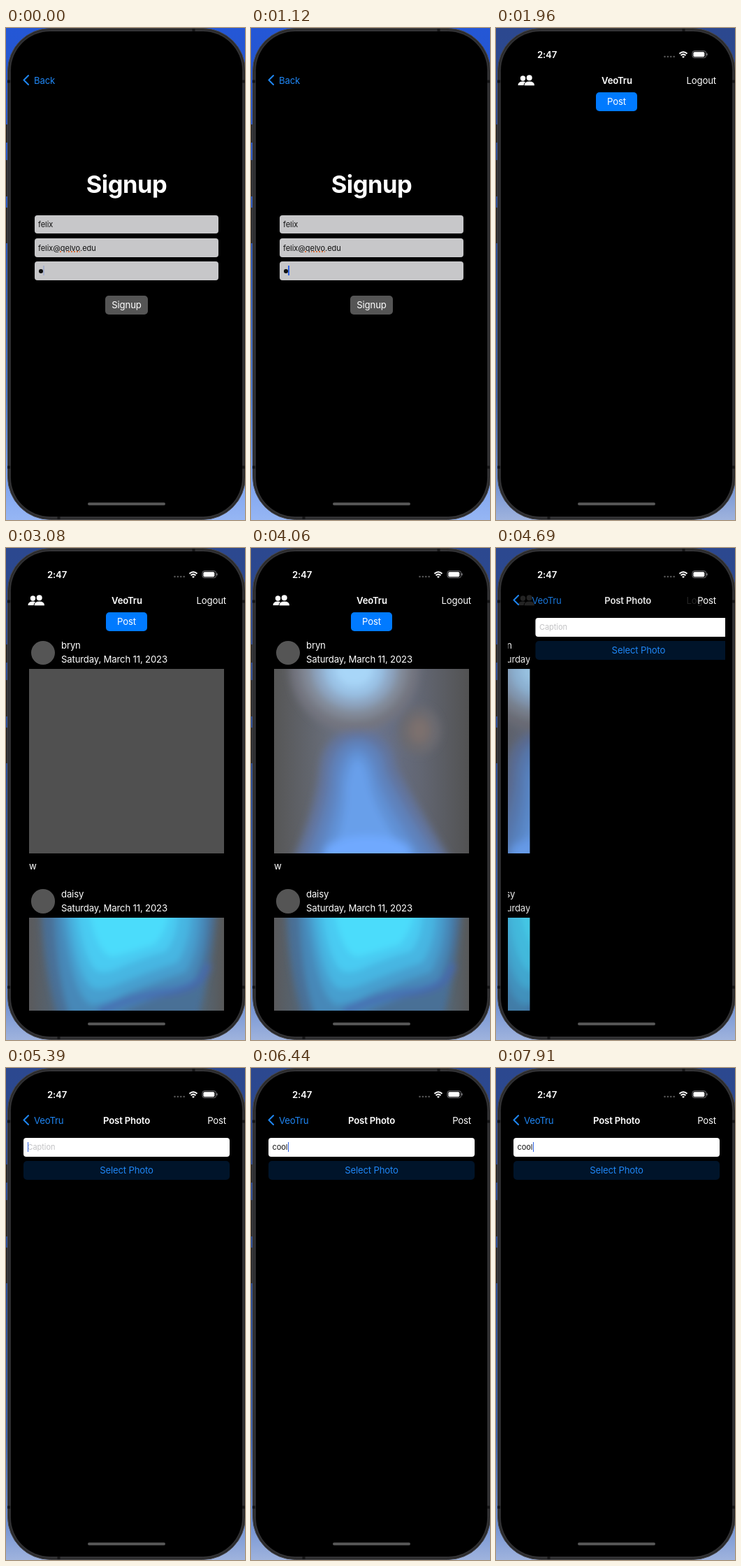
An HTML page that plays this animation: 342x704 px, repeating every 8000 ms.

```html
<!DOCTYPE html>
<html lang="en">
<head>
<meta charset="utf-8">
<title>Photo sharing app</title>
<style>
  html, body { margin: 0; width: 100%; height: 100%; overflow: hidden; background: #000; }
  #stage { position: absolute; left: 0; top: 0; width: 342px; height: 704px; overflow: hidden;
    font: 400 13.2px/20px Inter, "Open Sans", sans-serif; letter-spacing: -.18px; color: #fff;
    background: linear-gradient(#2c488f, #284a92 45%, #3d62ae 75%, #6f90d2 92%, #9fb3dd); }
  #stage.bright { background: linear-gradient(#2457d6, #2a55b4 45%, #4a78cc 75%, #7ea3ee 92%, #96b6f4); }
  #stage *, #stage svg { position: absolute; }
  #stage span span, #stage svg * { position: static; }
  span { white-space: nowrap; }
  .layer { left: 0; top: 0; width: 342px; height: 704px; }
  .clip { left: 17px; top: 0; width: 311px; height: 704px; overflow: hidden; }
  .clip > .layer { left: -17px; }
  .mid { left: 0; width: 345px; text-align: center; }
  .right { right: 27px; }
  .bold { font-weight: 600; }
  .blue { color: #1f86f4; }
  .small { font-size: 11px; letter-spacing: -.05px; color: #111; }
  .field { left: 41px; width: 263px; height: 26.5px; border-radius: 4px; background: #c7c7c9; }
  .btn { border-radius: 5px; text-align: center; line-height: 27px; height: 27px; }
  .avatar { left: 35.5px; width: 34.4px; height: 34.4px; border-radius: 50%; background: #555; }
  .pic { left: 32.8px; width: 279.4px; height: 264.6px; background: #505050; overflow: hidden; }
  .pic svg { left: 0; top: 0; }
  .misspelt { text-decoration: underline dotted #d8703c 1.5px; text-underline-offset: 1px; }
  .caret { width: 1.6px; height: 14px; background: #2f62e2; }
</style>
</head>
<body>
<div id="stage">
  <svg class="layer" viewBox="0 0 342 704">
    <path d="M1 138v26M1 189v52M1 257v51" stroke="#262628" stroke-width="3"/>
    <rect x="2.5" y=".5" width="340" height="703" rx="61" fill="#29292b" stroke="#48484b"/>
    <rect x="5.5" y="3.5" width="334" height="697" rx="58" fill="none" stroke="#39393b"/>
    <path d="M2 76.5h4M2 628.5h4M338 76.5h4M338 628.5h4M268.5 1v4M75.5 699v4" stroke="#151516" stroke-width="4"/>
    <rect x="7" y="5" width="331" height="694" rx="56" fill="#000"/>
  </svg>

  <div class="layer" id="signup">
    <svg class="layer" viewBox="0 0 342 704" fill="none" stroke="#1f86f4" stroke-width="2" stroke-linecap="round" stroke-linejoin="round"><path d="M32 68l-6.5 6.5 6.5 6.5"/></svg>
    <span class="blue" style="left:40px;top:65px">Back</span>
    <span class="mid" style="top:204px;line-height:40px;font-size:34.5px;font-weight:700;letter-spacing:-.5px">Signup</span>
    <div class="field" style="top:267.5px"></div>
    <div class="field" style="top:301px"></div>
    <div class="field" style="top:334px"></div>
    <span class="small" style="left:46px;top:271px">felix</span>
    <span class="small" style="left:46px;top:304.5px">felix@<span class="misspelt">qelvo</span>.edu</span>
    <div style="left:47px;top:345px;width:5.5px;height:5.5px;border-radius:50%;background:#111"></div>
    <div class="caret" id="passCaret" style="left:53px;top:340px"></div>
    <div class="btn" id="signBtn" style="left:142px;top:383px;width:61px;background:#555">Signup</div>
  </div>

  <div class="layer" id="app">
    <div class="clip">
      <div class="layer" id="feed">
        <div class="btn" style="left:142.6px;top:91.6px;width:59.8px;height:27.8px;background:#007aff">Post</div>
        <div class="layer" id="posts" style="height:662px;overflow:hidden">
          <div class="avatar" style="top:132.8px"></div>
          <span style="left:79px;top:129px">bryn</span>
          <span style="left:79px;top:149px">Saturday, March 11, 2023</span>
          <div class="pic" style="top:172.8px">
            <svg id="pic1" width="280" height="265" viewBox="0 0 280 265">
              <defs>
                <filter id="soft" x="-50%" y="-50%" width="200%" height="200%"><feGaussianBlur stdDeviation="6"/></filter>
                <linearGradient id="haze"><stop stop-color="#565656"/><stop offset=".25" stop-color="#666b76"/><stop offset=".45" stop-color="#6c7794"/><stop offset=".75" stop-color="#626672"/><stop offset="1" stop-color="#525252"/></linearGradient>
              </defs>
              <rect width="280" height="265" fill="url(#haze)"/>
              <g filter="url(#soft)">
                <ellipse cx="115" cy="0" rx="92" ry="90" fill="#73757f"/>
                <ellipse cx="115" cy="0" rx="76" ry="73" fill="#828a98"/>
                <ellipse cx="115" cy="0" rx="60" ry="57" fill="#8ea6c2"/>
                <ellipse cx="115" cy="0" rx="44" ry="42" fill="#9ac2e6"/>
                <ellipse cx="115" cy="0" rx="28" ry="26" fill="#a8d6f8"/>
                <ellipse cx="208" cy="88" rx="30" ry="34" fill="#6c6a70"/>
                <ellipse cx="208" cy="88" rx="15" ry="18" fill="#7c706e"/>
                <path d="M20 290Q62 200 66 140 72 92 120 88 168 92 174 140 200 190 262 290Z" fill="#62759e"/>
                <path d="M38 290Q78 200 80 146 88 102 120 100 154 104 160 146 182 196 246 290Z" fill="#5f82bc"/>
                <path d="M56 290Q92 205 92 156 100 116 119 114 140 118 148 156 164 204 228 290Z" fill="#6090d4"/>
                <path d="M72 290Q104 220 102 170 108 130 119 128 132 132 138 170 150 214 206 290Z" fill="#679fea"/>
                <ellipse cx="134" cy="264" rx="62" ry="26" fill="#6fa9fe"/>
              </g>
            </svg>
          </div>
          <span style="left:33px;top:445px">w</span>
          <div class="avatar" style="top:488.3px"></div>
          <span style="left:79px;top:484.5px">daisy</span>
          <span style="left:79px;top:504.5px">Saturday, March 11, 2023</span>
          <div class="pic" style="top:528.5px">
            <svg id="pic2" width="280" height="134" viewBox="0 0 280 134">
              <defs>
                <linearGradient id="sea"><stop stop-color="#5a5a5c"/><stop offset=".1" stop-color="#56626e"/><stop offset=".5" stop-color="#4a6c94"/><stop offset=".9" stop-color="#566470"/><stop offset="1" stop-color="#585858"/></linearGradient>
                <filter id="soft2" x="-50%" y="-50%" width="200%" height="200%"><feGaussianBlur stdDeviation="5"/></filter>
              </defs>
              <rect width="280" height="134" fill="url(#sea)"/>
              <g filter="url(#soft2)">
                <path d="M18-20H268Q262 70 240 150H44Q20 80 18-20Z" fill="#4a7096"/>
                <path d="M36-20H256Q256 60 232 96 190 112 150 126 120 140 90 150H62Q38 90 36-20Z" fill="#4788b8"/>
                <path d="M46-20H244Q246 40 224 78 180 92 140 108 110 126 88 124 60 110 46-20Z" fill="#469fcf"/>
                <path d="M56-20H232Q232 36 212 64 170 78 130 94 104 106 90 100 66 80 56-20Z" fill="#46b6e2"/>
                <path d="M68-20H214Q214 26 196 48 160 58 124 74 104 82 94 74 74 50 68-20Z" fill="#48cbf2"/>
                <path d="M84-20H202Q200 16 180 38 150 48 120 56 96 54 84-20Z" fill="#4cdcfb"/>
                <path d="M100 134Q150 112 200 106T256 66" fill="none" stroke="#4668b0" stroke-width="11" opacity=".75"/>
              </g>
            </svg>
          </div>
        </div>
        <div class="layer" id="dim" style="top:90px;height:580px;background:#000;opacity:0"></div>
      </div>

      <div class="layer" id="compose">
        <div style="left:17px;top:90px;width:311px;height:580px;background:#000"></div>
        <div style="left:24.8px;top:99.6px;width:295.4px;height:27.2px;border-radius:4px;background:#fff"></div>
        <span class="small" id="hint" style="left:30.5px;top:103px;color:#c2c2c4">Caption</span>
        <span class="small" style="left:30.5px;top:103px"><span id="typed"></span></span>
        <div class="caret" id="capCaret" style="top:106px"></div>
        <div class="btn blue" id="pickBtn" style="left:25px;top:133px;width:295px;background:#00142a">Select Photo</div>
      </div>
    </div>

    <div class="layer" id="oldNav">
      <svg class="layer" viewBox="0 0 342 704" fill="#fff">
        <circle cx="38.5" cy="72" r="3.7"/><path d="M31.5 82Q31.5 76.5 38.5 76.5 41 76.5 42 77.5 39.5 79 39.5 82Z"/>
        <circle cx="47.7" cy="71.2" r="4"/><path d="M40.5 82.200Q40.5 76.400 47.8 76.400T55 82.200Z"/>
      </svg>
      <span class="right" style="top:65px">Logout</span>
    </div>
    <span class="bold" id="oldTitle" style="left:151px;top:65px">VeoTru</span>
    <div class="layer" id="newNav">
      <svg class="layer" viewBox="0 0 342 704" fill="none" stroke="#1f86f4" stroke-width="2" stroke-linecap="round" stroke-linejoin="round"><path d="M32 68l-6.5 6.5 6.5 6.5"/></svg>
      <span class="blue" id="back" style="left:40px;top:65px">VeoTru</span>
      <span class="mid bold" id="newTitle" style="top:65px">Post Photo</span>
      <span class="right" style="top:65px">Post</span>
    </div>

    <span class="bold" style="left:59px;top:28px">2:47</span>
    <svg class="layer" viewBox="0 0 342 704" fill="none">
      <path d="M241.5 41h14" stroke="#555" stroke-width="2.6" stroke-linecap="round" stroke-dasharray="0 4.4"/>
      <path d="M262.5 36.8Q268 31.8 273.5 36.8M264.6 39.2Q268 36 271.4 39.2" stroke="#fff" stroke-width="2"/>
      <path d="M266 41Q268 39.4 270 41L268 43Z" fill="#fff"/>
      <rect x="281" y="32.8" width="19.6" height="9.8" rx="3" stroke="#77777a"/>
      <rect x="282.4" y="34.2" width="16" height="7" rx="1.8" fill="#fff"/>
      <path d="M302 36.2v3" stroke="#77777a" stroke-width="1.5"/>
    </svg>
  </div>
  <div style="left:117px;top:679px;width:111px;height:4px;border-radius:2px;background:#555"></div>
</div>

<script>
const el = {};
document.querySelectorAll('[id]').forEach(e => el[e.id] = e);
const LOOP = 8000, STEP = 70;
const show = (e, on) => e.style.visibility = on ? 'inherit' : 'hidden';
const fade = (e, v) => e.style.opacity = v;
const shift = (e, x) => e.style.transform = `translateX(${x}px)`;
const ramp = (t, a, b) => Math.min(1, Math.max(0, (t - a) / (b - a)));

// Critically damped push, with a short stall before it settles
function push(t) {
  if (t < 4410) return 0;
  if (t >= 5180) return 1;
  const u = Math.min(t, 4690) - 4405 + Math.max(0, t - 4830);
  const k = .0136 * u;
  return 1 - (1 + k) * Math.exp(-k);
}

function typedAt(t) {
  return 'cool'.slice(0, [5600, 6020, 6230, 6440].filter(s => t >= s).length);
}

// Dips at the start of a tap and recovers
const press = (t, at) => t < at || t >= at + 210 ? 1 : .62 + .38 * ramp(t, at + 70, at + 210);

function draw(now) {
  const t = Math.floor(now % LOOP / STEP) * STEP;
  const inApp = t >= 1750, p = push(t);
  el.stage.classList.toggle('bright', !inApp);
  show(el.signup, !inApp);
  show(el.app, inApp);

  const blink = t < 140 ? .2 * (1 - t / 140)
    : t < 700 ? ramp(t, 210, 420) : t < 910 ? 1 - ramp(t, 700, 840) : ramp(t, 910, 1120);
  fade(el.passCaret, t < 1260 ? blink : 0);
  fade(el.signBtn, press(t, 1260));

  show(el.posts, t >= 2030);
  show(el.pic2, t >= 3080);
  show(el.pic1, t >= 3290);

  show(el.feed, inApp && p < 1);
  if (p === 1) [el.posts, el.pic1, el.pic2].forEach(e => show(e, false));
  shift(el.feed, -93.3 * p);
  fade(el.dim, .1 * p);
  show(el.compose, p > 0);
  shift(el.compose, 311 * (1 - p));

  fade(el.oldNav, (1 - p) ** .85);
  fade(el.oldTitle, Math.max(0, 1 - 1.5 * p));
  shift(el.oldTitle, -111 * p);
  fade(el.newNav, Math.min(1, p * 1.1));
  shift(el.back, 111 * (1 - p));
  fade(el.back, p);
  shift(el.newTitle, 160 * (1 - p));
  fade(el.newTitle, p);

  const text = typedAt(t);
  el.typed.textContent = text;
  show(el.hint, p > 0 && !text);
  el.capCaret.style.left = 30.8 + el.typed.getBoundingClientRect().width + 'px';
  const lit = t < 7280 ? 1 - ramp(t, 6930, 7140) : ramp(t, 7280, 7490);
  fade(el.capCaret, t >= 5320 ? lit : 0);
  fade(el.pickBtn, press(t, 7000));
}

function tick() {
  draw(performance.now());
  requestAnimationFrame(tick);
}
tick();
</script>
</body>
</html>
```
